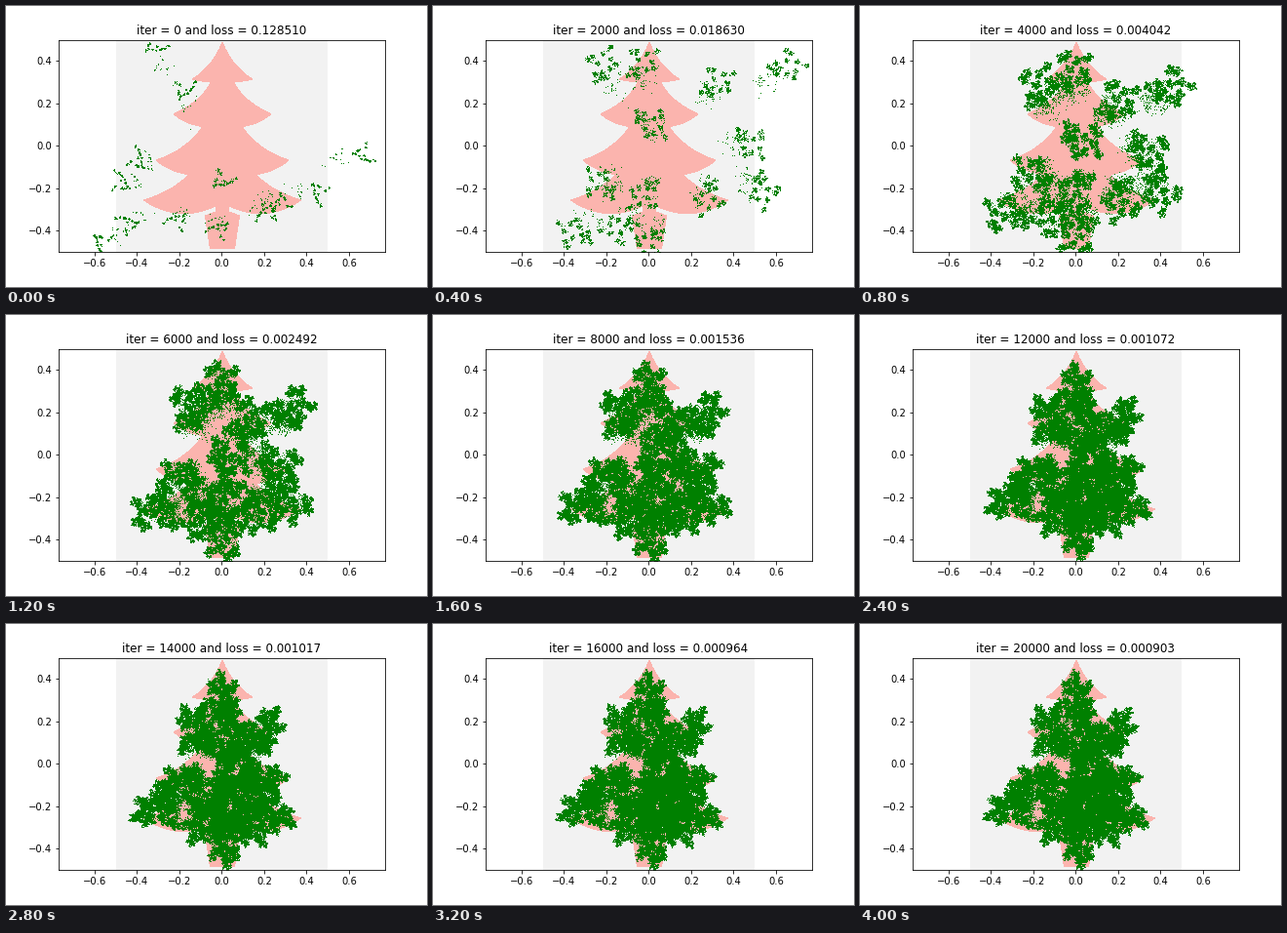
These frames come from a looping animation (432 px wide and 288 px high, 4100 ms). A matplotlib script:

```python
import numpy as np
import matplotlib.pyplot as plt
from matplotlib.animation import FuncAnimation

FRAMES, STEP = 41, 500
SCALE, CX, CY = 217.44, 221.4, 143.28  # pixels per unit and stage position of (0, 0)


def to_data(x, y):
    return (x - CX) / SCALE, (CY - y) / SCALE


# Path of each contracting map on the stage: first, early and fitted centre.
PATHS = np.array([
    [222 + 180j, 213 + 60j, 221 + 81j],
    [183 + 87j, 173 + 62j, 197 + 113j],
    [366 + 153j, 362 + 62j, 258 + 114j],
    [118 + 181j, 146 + 234j, 157 + 187j],
    [135 + 158j, 172 + 184j, 184 + 163j],
    [281 + 203j, 338 + 188j, 267 + 191j],
    [320 + 192j, 324 + 140j, 256 + 160j],
    [218 + 229j, 222 + 243j, 225 + 220j],
    [125 + 223j, 192 + 228j, 203 + 198j],
    [267 + 212j, 283 + 196j, 247 + 202j],
    [97 + 244j, 222 + 120j, 232 + 160j],
    [153 + 42j, 290 + 80j, 228 + 125j],
    [175 + 220j, 217 + 193j, 225 + 185j]])
SHRINK = [.085, .14, .305]
POINTS = [5000, 10000, 90000]
WIDE = .06  # share of points sent through one weakly contracting map

# Turn every copy so that its tip points away from the middle of the tree.
outward = PATHS[:, 2] - PATHS[:, 2].mean()
SPIN = 1j * outward / abs(outward)

rng = np.random.default_rng(4)
PICKS = rng.integers(len(PATHS), size=(6, POINTS[-1]))
PICKS[rng.random(PICKS.shape) < WIDE] = len(PATHS)


def stage_at(i):
    if i < 4:
        return i / 4
    return 2 - np.exp(-(i - 4) / 7)


def attractor(i):
    t = stage_at(i)
    k = min(int(t), 1)
    centre = PATHS[:, k] + (t - k) * (PATHS[:, k + 1] - PATHS[:, k])
    mean = centre.mean()
    factor = SPIN * np.interp(t, range(3), SHRINK)
    centre = np.append(centre, mean)
    factor = np.append(factor, .85)

    count = int(np.interp(t, range(3), POINTS))
    p = np.full(count, mean)
    for m in PICKS[:, :count]:
        p = centre[m] + factor[m] * (p - mean)
    return to_data(p.real, p.imag)


def loss_at(i):
    losses = [.128510, .018630, .004042, .001536, .001072, .000964, .000903]
    return np.exp(np.interp(i, [0, 4, 8, 16, 24, 32, 40], np.log(losses)))


def tree_outline():
    # Right half as quadratic curves: control point, then end point.
    curves = [((9, 61), (30.5, 75)), ((20, 78), (11, 77)),
              ((21, 98), (50, 110.5)), ((38, 121), (20, 123.5)),
              ((37, 148), (68, 158)), ((52, 171), (34, 172.5)),
              ((51, 190), (80.5, 199)), ((45, 223), (7, 205))]
    s = np.linspace(0, 1, 20)[:, None]
    start = np.array([0, 37])
    parts = []
    for ctrl, end in np.array(curves):
        parts.append((1 - s) ** 2 * start + 2 * s * (1 - s) * ctrl + s ** 2 * end)
        start = end
    parts.append(np.array([(7, 211), (17.5, 215), (12.5, 249)]))
    right = np.vstack(parts)
    whole = np.vstack([right, right[::-1] * (-1, 1)])
    return to_data(whole[:, 0] + 222, whole[:, 1])


fig, ax = plt.subplots(figsize=(6, 4), dpi=72)
fig.subplots_adjust(left=.125, right=.9, bottom=.125, top=.88)
ax.set_xlim(-.76987, .76987)
ax.set_ylim(-.5, .5)
ax.axvspan(-.5, .5, color="#f2f2f2", lw=0, zorder=0)
ax.fill(*tree_outline(), color="#fbb4ae", lw=0, antialiased=False, zorder=1)
points, = ax.plot([], [], ",", color="green", zorder=2)
title = ax.set_title("")


def draw(i):
    points.set_data(*attractor(i))
    title.set_text(f"iter = {i * STEP} and loss = {loss_at(i):.6f}")
    return points, title


anim = FuncAnimation(fig, draw, frames=FRAMES, interval=100, repeat=True, repeat_delay=0)
plt.show()
```
